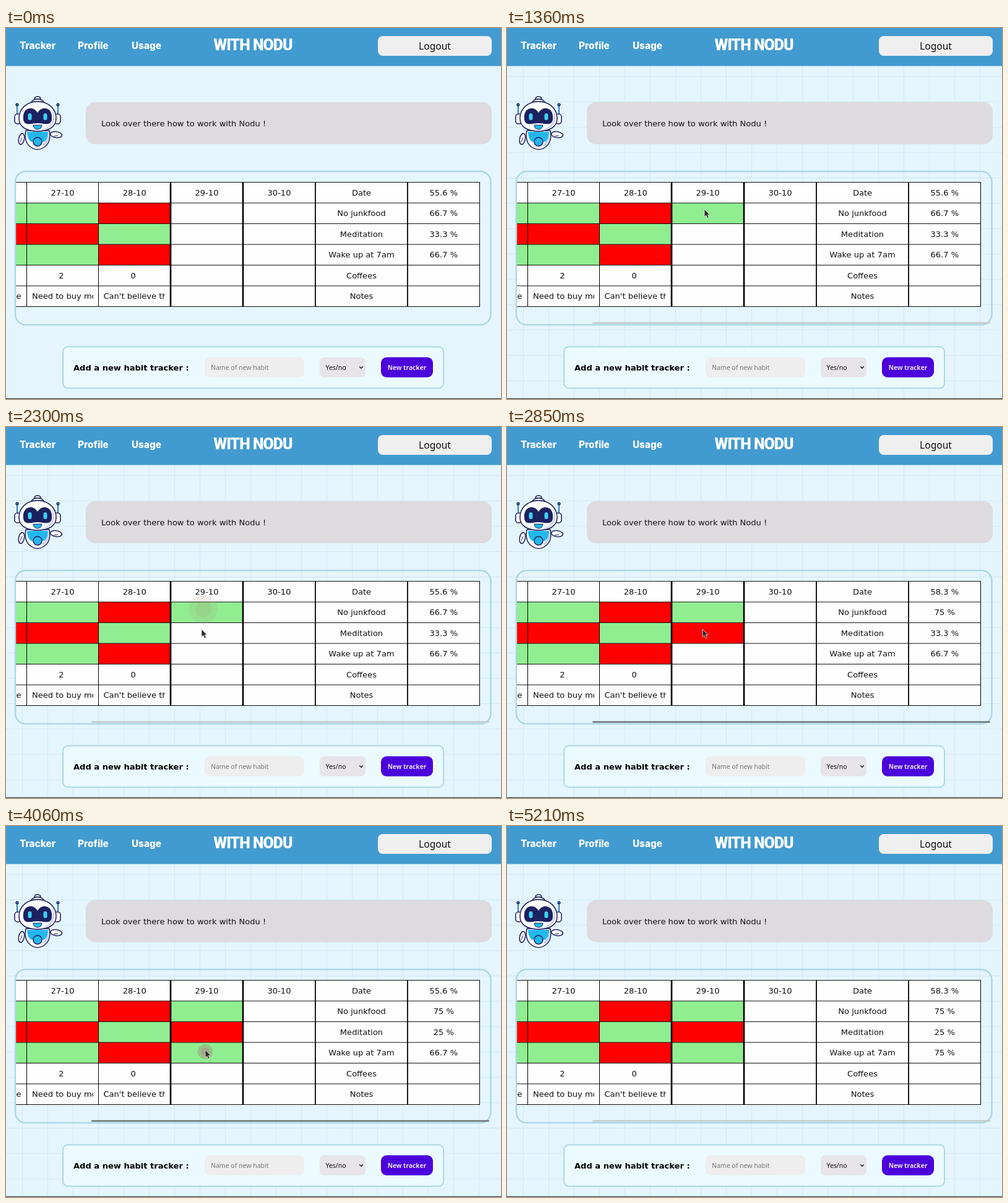
Animation, 800 px wide and 600 px high, one loop 5330 ms. Source, as an HTML page:

```html
<!DOCTYPE html>
<html lang="en">
<head>
<meta charset="utf-8">
<title>Habit tracker</title>
<style>
  html, body { margin: 0; width: 100%; height: 100%; overflow: hidden; background: #e4f5fe; }
  svg { display: block; }
  text { font: 13.05px "DejaVu Sans", sans-serif; fill: #111; }
  .mid { text-anchor: middle; }
  .nav { font: 800 15.3px Inter, sans-serif; fill: #fff; }
  .title { font: 900 25px Roboto, sans-serif; letter-spacing: -1px; fill: #fff; }
  .logout { font: 15.6px "Noto Sans", sans-serif; }
  .label { font-weight: bold; fill: #000; }
  .small { font: 10.5px "Noto Sans", sans-serif; }
  .hint { fill: #777; }
  .action { font-weight: 700; font-size: 10.2px; fill: #eae6fa; }
  .robot { stroke: #20245f; stroke-width: 1.6; stroke-linejoin: round; fill: #fff; }
  .robot .cyan { fill: #22b8ec; }
  .robot .navy { fill: #1c2160; }
  .robot .shade { fill: #c9cfea; stroke: none; }
</style>
</head>
<body>
<svg width="800" height="600" viewBox="0 0 800 600">
  <defs>
    <clipPath id="scroller"><rect x="16" y="240" width="766" height="220"/></clipPath>
    <clipPath id="note1"><rect x="40" y="418" width="101" height="32"/></clipPath>
    <clipPath id="note2"><rect x="156" y="418" width="101" height="32"/></clipPath>
  </defs>

  <path id="grid" stroke="#d2eaf3" fill="none"/>
  <rect width="800" height="61.5" fill="#429bd0"/>
  <text class="nav" x="22" y="34.3">Tracker</text>
  <text class="nav" x="116" y="34.3">Profile</text>
  <text class="nav" x="203" y="34.3">Usage</text>
  <text class="title mid" x="399" y="35.5">WITH NODU</text>
  <rect x="601" y="13" width="184" height="32" rx="8" fill="#efeff0"/>
  <text class="logout mid" x="693" y="35">Logout</text>

  <g class="robot">
    <path d="M18 124V142M84 124V142" stroke="#2a7fc0" stroke-width="2"/>
    <circle cx="18" cy="124" r="1.8" class="cyan"/>
    <circle cx="84" cy="124" r="1.8" class="cyan"/>
    <path d="M46 115Q46 111 51 111Q56 111 56 115Z"/>
    <path d="M40 123Q41 115 51 115Q61 115 62 123Z"/>
    <path d="M43 119H59" stroke-width="1"/>
    <rect x="14" y="139" width="10" height="16" rx="4.5"/>
    <rect x="78" y="139" width="10" height="16" rx="4.5"/>
    <ellipse cx="25" cy="179.500" rx="4.500" ry="9" transform="rotate(12 25 179.500)"/>
    <path d="M23 184l3-7" stroke-width="1"/>
    <ellipse cx="81" cy="172.500" rx="9.500" ry="4.800" transform="rotate(8 81 172.500)"/>
    <path d="M77 175l7-1" stroke-width="1"/>
    <path d="M32 166Q29 183 38 191Q51 202 64 191Q73 183 70 166Z"/>
    <path class="shade" d="M62 191Q71 183 69 169Q67 182 58 189Z"/>
    <path class="cyan" stroke="none" d="M34 168H68Q68 179 62 184H40Q34 179 34 168Z"/>
    <circle cx="51" cy="184" r="7" class="cyan"/>
    <path d="M51 119C69 119 81 131 81 146C81 160 69 167 51 167C33 167 21 160 21 146C21 131 33 119 51 119Z"/>
    <path class="shade" d="M73 130Q84 146 72 159Q63 166 51 166Q70 162 74 152Q78 142 73 130Z"/>
    <path class="navy" stroke="none" d="M51 137C48 132 43 129 38 130C30 131 27 139 28 148C29 155 34 156 41 155Q51 153 61 155C68 156 73 155 74 148C75 139 72 131 64 130C59 129 54 132 51 137Z"/>
    <rect x="35.500" y="138" width="6" height="11" rx="3" fill="#3fd0f6" stroke="none"/>
    <rect x="60.500" y="138" width="6" height="11" rx="3" fill="#3fd0f6" stroke="none"/>
    <path class="cyan" stroke-width="1" d="M44 157H58Q57 164 51 164Q45 164 44 157Z"/>
  </g>

  <rect x="129" y="120" width="656" height="68" rx="15" fill="#dddbdf"/>
  <text x="154" y="159">Look over there how to work with Nodu !</text>

  <g id="table" clip-path="url(#scroller)"></g>
  <rect x="15" y="232" width="768.500" height="248" rx="17" fill="none" stroke="#add8e4" stroke-width="2.500"/>
  <rect id="bar" x="138" y="475.700" width="643" height="2.600" rx="1.300"/>

  <rect x="92" y="515.500" width="615" height="67" rx="8" fill="#ebfafe" stroke="#add8e4" stroke-width="2"/>
  <text class="label" x="109" y="553.500">Add a new habit tracker :</text>
  <rect x="321" y="532.500" width="161" height="32.500" rx="8" fill="#eeeeef"/>
  <text class="small hint" x="331" y="553">Name of new habit</text>
  <rect x="507" y="532.500" width="74" height="32.500" rx="7" fill="#e7e5e9"/>
  <text class="small" x="516.500" y="553">Yes/no</text>
  <path d="M571.200 547.500l2.800 2.800l2.800-2.800" fill="none" stroke="#222" stroke-width="1.500"/>
  <rect x="606" y="532.500" width="84" height="32.500" rx="9" fill="#4b00dc"/>
  <text class="small action mid" x="648" y="553">New tracker</text>
  <rect y="598.800" width="800" height="1.200" fill="#3b4348"/>

  <g id="ripple" fill="#a58a80"><circle/><circle/></g>
  <path id="beam" d="M-3-6.500Q0-6.500 0-5Q0-6.500 3-6.500M0-5V5M-3 6.500Q0 6.500 0 5Q0 6.500 3 6.500" fill="none" stroke="#777" stroke-width="1.800"/>
  <path id="arrow" d="M0 0V12.500L2.800 10L4.900 14.600L7.200 13.500L5.200 9.200H8.800Z" fill="#2b2b2b" stroke="#e8e8e8" stroke-width=".8"/>
</svg>

<script>
const LOOP = 5330;
const GREEN = '#90ee90', RED = '#ff0000', WHITE = '#fefefe';
const $ = id => document.getElementById(id);

// Page grid
let grid = '';
for (let y = 78.5; y < 600; y += 41) grid += `M0 ${y}H800`;
for (let x = 26.5; x < 800; x += 41) grid += `M${x} 61V600`;
$('grid').setAttribute('d', grid);

// Table
const top0 = 249.5, rowH = 33.5;
const cols = [-82, 33.5, 149.5, 266, 383, 500, 649, 765.5];
const rowY = r => top0 + r * rowH;
const colMid = c => (cols[c] + cols[c + 1]) / 2;
const label = (c, r, s, id = '') =>
  `<text class="mid" ${id && `id="${id}"`} x="${colMid(c) - (r === 4 && c < 3 ? 2 : 0)}" y="${rowY(r) + 21.3}">${s}</text>`;
const cell = (c, r, fill, id = '') =>
  `<rect ${id && `id="${id}"`} x="${cols[c]}" y="${rowY(r)}" width="${cols[c + 1] - cols[c]}" height="${rowH}" fill="${fill}"/>`;

function buildTable() {
  let s = `<rect x="0" y="${top0}" width="765.5" height="${6 * rowH}" fill="${WHITE}"/>`;
  const marks = ['GRG', 'GRG', 'RGR'];
  marks.forEach((m, c) => [...m].forEach((k, i) => s += cell(c, i + 1, k === 'G' ? GREEN : RED)));
  for (let r = 1; r < 4; r++) s += cell(3, r, WHITE, 'mark' + r);

  let lines = '';
  for (let r = 0; r < 7; r++) lines += `M0 ${rowY(r)}H766`;
  s += `<path d="${lines}" stroke="#111"/>`;
  cols.forEach((x, c) => {
    const w = [1, 1, 1, 2.6, 2.6, 1.8, 1.8, 1][c];
    s += `<path d="M${x} ${top0}V${rowY(6)}" stroke="#000" stroke-width="${w}"/>`;
  });

  ['27-10', '28-10', '29-10', '30-10'].forEach((d, i) => s += label(i + 1, 0, d));
  ['Date', 'No junkfood', 'Meditation', 'Wake up at 7am', 'Coffees', 'Notes']
    .forEach((d, r) => s += label(5, r, d));
  for (let r = 0; r < 4; r++) s += label(6, r, '', 'rate' + r);
  s += label(1, 4, '2') + label(2, 4, '0');
  const y = rowY(5) + 21.3;
  s += `<text x="24.500" y="${y}" text-anchor="end">e</text>
    <text x="42" y="${y}" clip-path="url(#note1)">Need to buy more</text>
    <text x="157.500" y="${y}" clip-path="url(#note2)">Can't believe that</text>`;
  $('table').innerHTML = s;
}
buildTable();

// Timelines: [start, value]
const marks = [
  [[0, WHITE], [1270, GREEN]],
  [[0, WHITE], [2420, GREEN], [2680, RED]],
  [[0, WHITE], [3560, GREEN]]
];
const rates = [
  [[0, '55.6 %'], [2850, '58.3 %'], [3750, '55.6 %'], [4600, '58.3 %']],
  [[0, '66.7 %'], [2850, '75 %']],
  [[0, '33.3 %'], [3750, '25 %']],
  [[0, '66.7 %'], [4600, '75 %']]
];
const bar = [[0, 'none'], [300, '#c3c8ca'], [2850, '#6d7275'], [4700, '#c3c8ca']];
const clicks = [[1800, 319, 295], [3090, 316, 328], [3990, 322, 365]];
const path = [
  [200, 300, -20], [520, 311, 266], [700, 315, 285], [950, 319, 293], [1750, 319, 293],
  [2150, 316, 327], [2850, 316, 327], [3200, 322, 362], [4250, 322, 362], [4750, 400, 620]
];

const valueAt = (steps, t) => steps.filter(s => s[0] <= t).pop()[1];
const clamp = v => Math.max(0, Math.min(1, v));

function pointer(t) {
  const i = path.findIndex(k => k[0] > t);
  if (i < 1) return null;
  const [a, b] = [path[i - 1], path[i]];
  const p = (t - a[0]) / (b[0] - a[0]);
  const e = p * p * (3 - 2 * p);
  return [a[1] + (b[1] - a[1]) * e, a[2] + (b[2] - a[2]) * e];
}

function place(el, show, x, y) {
  el.style.display = show ? '' : 'none';
  if (show) el.setAttribute('transform', `translate(${x} ${y})`);
}

function drawRipple(t) {
  const hit = clicks.find(c => t >= c[0] && t < c[0] + 600);
  place($('ripple'), !!hit, hit && hit[1], hit && hit[2]);
  if (!hit) return;
  const p = (t - hit[0]) / 600;
  const r = 23 * (1 - (1 - p) ** 6);
  [...$('ripple').children].forEach((c, i) => {
    c.setAttribute('r', i ? r * 0.55 : r);
    c.setAttribute('opacity', 0.42 * (1 - p) + 0.08);
  });
}

function draw(t) {
  $('grid').setAttribute('opacity', clamp((t - 60) / 240));
  $('bar').setAttribute('fill', valueAt(bar, t));
  marks.forEach((m, i) => $('mark' + (i + 1)).setAttribute('fill', valueAt(m, t)));
  rates.forEach((m, i) => $('rate' + i).textContent = valueAt(m, t));
  drawRipple(t);
  const at = pointer(t) || [0, -50];
  const overText = at[1] > 256 && at[1] < 276;
  place($('beam'), overText, ...at);
  place($('arrow'), !overText, ...at);
}

const start = performance.now();
function tick() {
  draw((performance.now() - start) % LOOP);
  requestAnimationFrame(tick);
}
tick();
</script>
</body>
</html>
```
